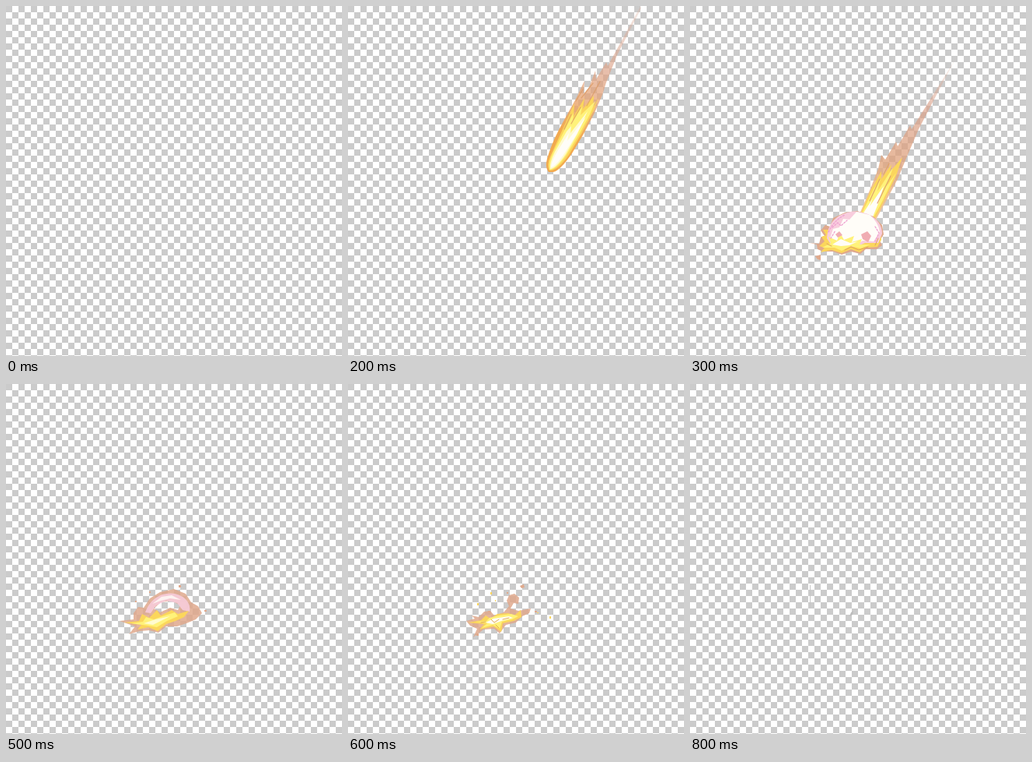
Animation, 432 px wide and 449 px high, one loop 0.9 s. Source, as an HTML page:

```html
<!DOCTYPE html>
<html lang="en">
<head>
<meta charset="utf-8">
<title>Fireball impact</title>
<style>
  html, body { margin: 0; width: 100%; height: 100%; overflow: hidden; }
  svg { display: block; width: 100vw; height: 100vh; }
  .pose {
    visibility: hidden;
    animation: show 900ms step-end infinite;
    animation-delay: calc((var(--step) - 9) * 100ms);
  }
  @keyframes show {
    0% { visibility: visible; }
    11.11111%, 100% { visibility: hidden; }
  }
  .smoke { fill: #e0a98c; }
  .gold { fill: #fbd65c; }
  .yellow { fill: #fff27a; }
  .pale { fill: #fffbd0; }
  .white { fill: #fffdf8; }
  .pink { fill: #f8cddd; }
  .rose { fill: #f0adb2; }
  .line { fill: none; stroke-linecap: round; stroke-linejoin: round; }
</style>
</head>
<body>
<svg viewBox="0 0 432 449" preserveAspectRatio="none">
  <defs>
    <pattern id="checks" width="16" height="16" patternUnits="userSpaceOnUse">
      <path fill="#cbcbcb" d="M0 0h16v16H0z"/>
      <path fill="#fff" shape-rendering="crispEdges" d="M8 0h8v8H8zM0 8h8v8H0z"/>
    </pattern>
    <linearGradient id="tail" gradientUnits="userSpaceOnUse" x1="376" y1="0" x2="285" y2="165">
      <stop offset="0" stop-color="#d9aa98" stop-opacity=".25"/>
      <stop offset=".5" stop-color="#dda388" stop-opacity=".7"/>
      <stop offset=".72" stop-color="#e6a375" stop-opacity=".75"/>
      <stop offset="1" stop-color="#f2a94f"/>
    </linearGradient>
    <linearGradient id="wake" gradientUnits="userSpaceOnUse" x1="343" y1="65" x2="224" y2="274">
      <stop offset="0" stop-color="#dfb8a8" stop-opacity=".1"/>
      <stop offset=".3" stop-color="#d99f88" stop-opacity=".65"/>
      <stop offset=".65" stop-color="#dfa07a" stop-opacity=".75"/>
      <stop offset="1" stop-color="#f8cf9a"/>
    </linearGradient>
    <linearGradient id="streak" gradientUnits="userSpaceOnUse" x1="0" y1="214" x2="0" y2="268">
      <stop offset="0" stop-color="#dda895" stop-opacity=".25"/>
      <stop offset=".5" stop-color="#e5a77b" stop-opacity=".85"/>
      <stop offset="1" stop-color="#f4c9a0"/>
    </linearGradient>
    <g id="meteor">
      <path fill="url(#tail)" d="M258 213Q253 207 256 196Q261 178 272 157L288 128L294 117L304 96L303 113L310 104L318 83L319 94L332 72L334 77L376 0L377 3L346 63L332 98L327 114L317 137L303 164L288 189Q273 211 264 213Z"/>
      <path class="gold" d="M259 211Q255 204 260 193L276 158L291 125L290 142L304 118L302 132L316 115L315 130L322 118L316 134L300 164L284 191Q269 212 259 211Z"/>
      <path class="yellow" d="M259 210Q257 201 264 187L278 160L290 137L289 147L301 129L299 140L318 122L311 139L297 165L281 191Q267 211 259 210Z"/>
      <path class="pale" d="M260 209Q259 201 266 187L281 161L287 154L286 163L308 135L295 164L280 190Q267 209 260 209Z"/>
      <path class="white" d="M261 207Q261 200 270 185L284 163L282 173L306 142L293 166L279 188Q267 206 261 207Z"/>
      <path class="line" stroke="#dc9b65" stroke-width="1.3" opacity=".75" d="M278 158L287 139M287 151L299 130M293 122L302 107M307 128L324 97M300 118L315 99"/>
    </g>
  </defs>

  <path fill="url(#checks)" d="M0 0h432v449H0z"/>

  <g class="pose" style="--step:1"><use href="#meteor" x="52" y="-95"/></g>
  <g class="pose" style="--step:2"><use href="#meteor"/></g>

  <g class="pose" style="--step:3">
    <path fill="url(#wake)" d="M217 269L232 234L242 209L246 191L251 197L265 174L267 180L283 153L285 158L343 65L318 112L294 158L279 193L267 222L250 254L238 276Z"/>
    <path class="gold" d="M218 270L233 235L246 212L246 222L259 203L257 213L273 194L265 218L249 251L237 274Z"/>
    <path class="yellow" d="M219 270L236 235L245 221L241 238L261 207L253 231L265 214L247 251L235 273Z"/>
    <path class="white" d="M220 270L235 247L231 257L249 231L243 251L234 273Z"/>
    <path class="line" stroke="#e0a36b" stroke-width="1.2" d="M231 250L244 222M241 253L258 218M249 216L256 202"/>
    <path class="smoke" d="M154 304L166 305L168 297L173 295L168 288L174 281L180 283L184 272L199 265L215 263L236 270L247 281L249 293L244 301L247 307L240 312L226 312L219 318L207 315L195 319L184 315L171 315L164 312L163 306ZM161 321L168 319L168 326L164 325Z"/>
    <path class="gold" d="M166 308L173 302L169 296L175 294L171 287L180 287L198 269L225 269L245 284L246 300L241 309L226 310L218 316L207 312L195 317L182 313L168 316L173 310Z"/>
    <path class="pink" d="M176 298Q177 278 192 269Q210 259 229 267Q247 276 247 292L242 304L225 304L213 309L194 306L183 309Z"/>
    <path class="white" d="M180 298L184 286L192 284L197 273L205 274L214 264L231 268Q242 277 244 290L236 302L222 301L212 307L195 303Z"/>
    <path class="yellow" d="M170 310L181 304L178 296L189 301L193 291L198 300L211 295L208 303L221 299L218 306L232 306L219 311L207 308L195 314L186 310Z"/>
    <path class="white" d="M183 306L194 299L206 304L216 302L205 307L194 308Z"/>
    <path class="rose" d="M187 293L192 289L196 294L190 297ZM220 293L228 289L233 295L229 303L222 299Z"/>
    <path class="line" stroke="#eea0d0" stroke-width="1.3" stroke-dasharray="2 2" d="M178 290Q185 275 199 268M183 284L190 278L194 282L202 275M238 283L243 291L238 302M181 298L187 288"/>
    <path class="line" stroke="#dfa05c" d="M176 305L182 308M199 313L207 309L217 313L229 309M242 298L238 307"/>
  </g>

  <g class="pose" style="--step:4">
    <path fill="url(#streak)" d="M215 263L221 250L228 232L238 214L232 234L221 263ZM234 269L243 251L250 235L263 225L252 247L240 272Z"/>
    <path class="line" stroke="#fff3d2" stroke-width="1.4" d="M219 259L227 241M238 266L249 245"/>
    <path class="rose" d="M148 304L164 302L166 296L162 289L167 281L173 283L182 270L196 262L215 258L232 265L242 278L245 285L254 285L257 296L251 302L253 308L240 318L225 319L205 318L193 316L183 321L173 314L158 319L151 318L160 311Z"/>
    <path class="gold" d="M151 305L167 304L172 298L165 291L169 284L177 284L187 273L207 267L232 275L243 288L253 288L254 296L248 304L249 310L239 316L224 315L207 317L193 313L182 318L175 311L155 317L164 309Z"/>
    <path class="pink" d="M173 299Q173 278 190 267Q212 255 230 265Q245 275 246 294L240 306L224 304L211 310L194 306L181 308Z"/>
    <path class="white" d="M177 295Q180 279 194 273Q199 263 213 262Q230 263 237 275Q243 282 241 296L236 289L229 291L225 280L213 278L205 281L191 283L187 293Z"/>
    <path class="rose" d="M182 291L197 279L218 279L231 289L232 302L217 305L203 297L193 303L182 301Z"/>
    <path class="yellow" d="M153 306L171 305L177 298L187 302L189 290L198 290L204 280L206 290L216 283L222 292L215 300L225 304L211 307L205 301L195 310L184 315L177 309L164 311Z"/>
    <path class="pale" d="M170 308L184 306L193 295L202 295L209 286L212 294L202 302L193 308L182 312Z"/>
    <path class="white" d="M224 288L230 293L225 300L219 296ZM191 286L198 282L200 288Z"/>
    <path class="line" stroke="#eea3bd" stroke-width="1.3" stroke-dasharray="2 2" d="M176 293Q181 275 194 269M185 284L193 274M234 275L241 284L238 299M202 267L210 270M231 298L237 304"/>
    <path class="line" stroke="#e79b4e" stroke-width="1.2" d="M196 312L205 315L213 311L222 315L233 311L241 313M245 292L250 294M167 289L172 292"/>
    <path class="rose" opacity=".8" d="M151 316h8v3h-8zM164 320h4v2h-4z"/>
  </g>

  <g class="pose" style="--step:5">
    <path class="smoke" opacity=".85" fill-rule="evenodd" d="M146 304L164 302L164 294L170 286L177 287L185 275L198 267L216 263L231 269L238 280L247 285L252 294L244 302L232 307L220 311L206 311L196 319L184 316L172 317L158 321L166 311ZM190 288L199 280L213 278L224 284L221 290L211 287L198 293Z"/>
    <path class="pink" opacity=".85" d="M179 293Q185 276 201 270Q219 265 231 276Q238 284 236 292L227 290L220 281L206 278L193 284L186 294Z"/>
    <path class="gold" d="M152 306L171 304L175 295L184 300L194 290L199 297L213 290L221 295L235 291L229 299L218 304L206 308L195 317L183 312L169 315L174 309Z"/>
    <path class="yellow" d="M161 307L176 305L180 299L190 302L201 298L217 293L221 298L207 304L194 312L183 310Z"/>
    <path class="pale" d="M177 307L192 302L211 298L199 304L189 309Z"/>
    <path class="white" opacity=".8" d="M188 282L200 273L213 271L225 277L211 275L199 278Z"/>
    <path class="smoke" d="M184 266h2v2h-2zM222 258h3v3h-3zM255 290h3v2h-3zM166 278h2v2h-2z"/>
  </g>

  <g class="pose" style="--step:6">
    <path class="smoke" opacity=".85" d="M152 304L163 301L159 297L168 299L175 292L183 291L188 297L200 293L207 285L204 278L207 271L214 269L220 274L219 282L213 281L209 288L219 291L235 288L233 294L224 298L216 306L203 309L195 320L188 314L174 315L161 325L166 314L157 310Z"/>
    <path class="gold" d="M154 306L171 303L177 297L183 301L192 295L206 294L214 297L222 290L223 299L213 304L199 307L197 318L187 311L169 315L175 308Z"/>
    <path class="yellow" d="M164 305L178 304L182 300L194 297L210 295L219 298L211 302L198 305L195 314L186 309L172 313L179 307Z"/>
    <path class="white" d="M177 306L187 301L207 298L212 300L197 304L186 308Z"/>
    <path class="line" stroke="#e2ad53" d="M171 306L177 305M184 302L188 306L194 302M199 302L207 300M190 309L194 313"/>
    <path class="smoke" d="M221 259l5-2l1 4l-4 1zM204 267h2v2h-2zM240 291h3v2h-3zM180 291h3v2h-3zM165 320h3v3h-3z"/>
    <path class="gold" d="M183 267h2v3h-2zM166 281h2v3h-2zM259 298h2v3h-2zM189 277h1v2h-1zM243 293h2v1h-2z"/>
  </g>

  <g class="pose" style="--step:7">
    <path class="smoke" opacity=".55" d="M160 305L170 302L176 306L171 310ZM179 298L185 296L188 300L182 302ZM193 301L205 297L216 299L207 303L196 306ZM205 284L210 278L214 281L209 287ZM222 292L231 290L227 295Z"/>
    <path class="gold" opacity=".65" d="M178 307L191 303L201 304L190 309Z"/>
    <path class="smoke" opacity=".6" d="M224 261h2v2h-2zM169 278h1v2h-1zM251 297h2v1h-2z"/>
  </g>

  <g class="pose" style="--step:8">
    <path fill="#c6c6c6" d="M154 258h1v29h-1z"/>
    <path fill="#bcbcbc" d="M205 298L207 293L210 291L209 296Z"/>
  </g>
</svg>
</body>
</html>
```
